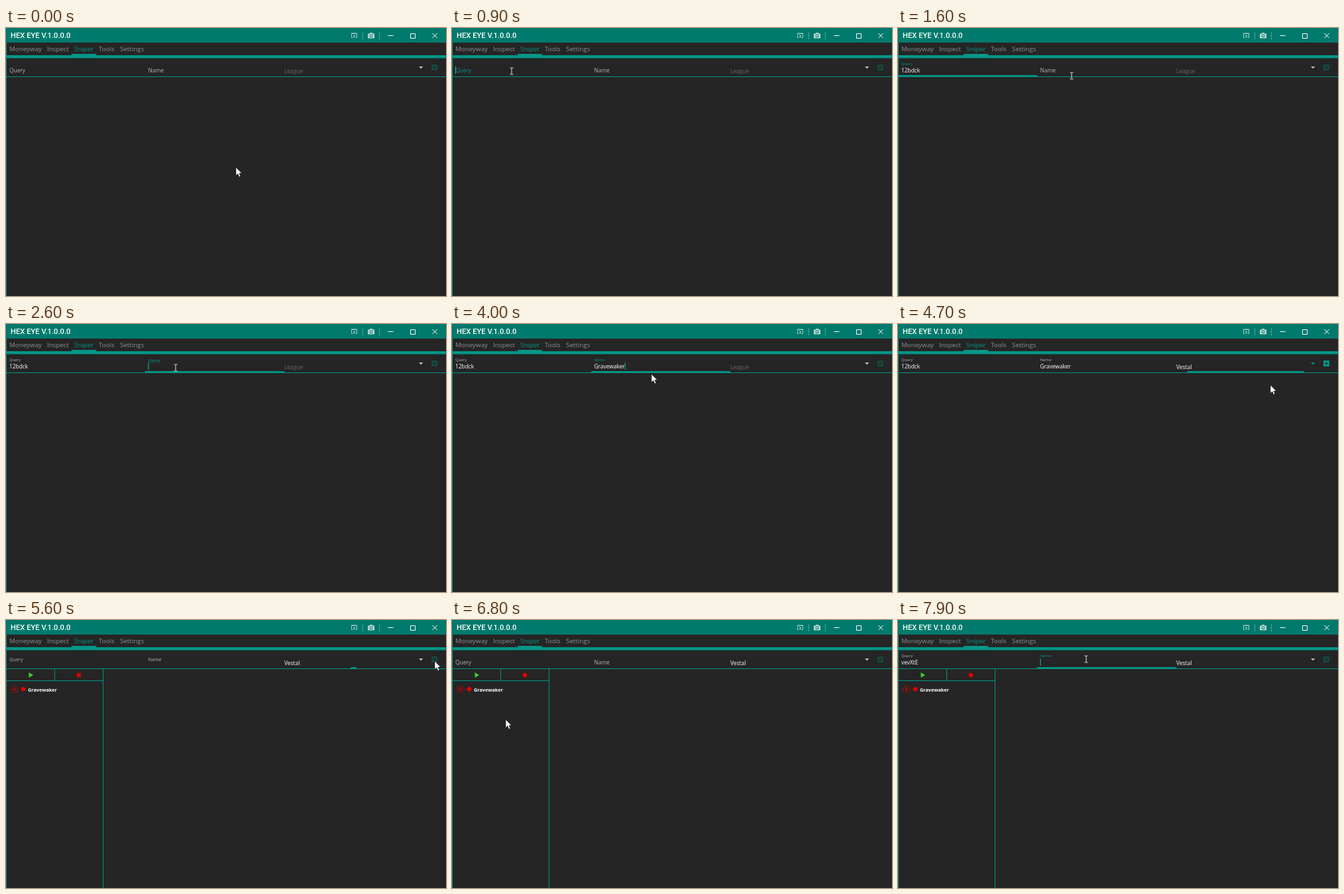
Write an HTML page that moves like this. It is 664 px wide and 404 px high and loops after 8 s.

```html
<!DOCTYPE html>
<html lang="en">
<head>
<meta charset="utf-8">
<title>Sniper tab</title>
<style>
  html, body { margin: 0; width: 100%; height: 100%; overflow: hidden; background: #252525; }
  svg { display: block; width: 664px; height: 404px; font-family: "Open Sans", "Noto Sans", sans-serif; }
  .title { font: 500 11.2px Roboto, sans-serif; fill: #fff; }
  .tabs { font-size: 9.8px; fill: #8f8f8f; }
  .value { font-size: 8.4px; fill: #fff; }
  .tree { font-size: 7.3px; font-weight: 700; fill: #fff; }
  .teal { fill: #009688; }
  .line { stroke: #009688; fill: none; }
</style>
</head>
<body>
<svg viewBox="0 0 664 404">
  <rect width="664" height="404" fill="#252525"/>
  <rect width="664" height="22" fill="#007a6d"/>
  <text class="title" x="7" y="15.3">HEX EYE V.1.0.0.0</text>
  <g fill="none" stroke="#9fcdc7">
    <path d="M523.5 14.5h-2v-6.5h8v6.5h-2M521 8.5h9M525.5 15v-4M523.7 12.6l1.8-1.8 1.8 1.8"/>
    <path d="M538.5 6v11M563.5 6v11" stroke="#4fa59b"/>
  </g>
  <path d="M546 8.5h2.5l1-1.5h3l1 1.5h2.500v7h-10z" fill="#b5d6d2"/>
  <circle cx="551" cy="11.800" r="2" fill="#b5d6d2" stroke="#007a6d"/>
  <path d="M576.500 11.500h8M610.500 8.500h7v7h-7zM643.500 8l7 7M650.500 8l-7 7" fill="none" stroke="#fff"/>

  <g class="tabs">
    <text x="5" y="35">Moneyway</text>
    <text x="62" y="35">Inspect</text>
    <text class="teal" x="103" y="35">Sniper</text>
    <text x="140" y="35">Tools</text>
    <text x="172" y="35">Settings</text>
  </g>
  <path class="teal" d="M99 39h37v2h-37zM0 41h664v4.500h-664zM0 73h664v1h-664zM0 22h1v382h-1z"/>

  <g id="panel">
    <path class="line" d="M146.500 74v330M1 91.500h145M73.500 74v17"/>
    <path d="M34.500 79l6.500 4-6.500 4z" fill="#3bd12f"/>
    <path d="M107 80h6v6h-6z" fill="#e00000"/>
    <path d="M10.500 100h5l2.500 2.500v4l-2.500 2.500h-5l-2.500-2.500v-4z" fill="none" stroke="#d00000"/>
    <path d="M11.500 103h3v3h-3z" fill="#d00000"/>
    <path d="M24.700 101h2.700l1.900 1.900v2.700l-1.900 1.900h-2.700l-1.900-1.900v-2.700z" fill="#e00000"/>
    <text class="tree" x="33" y="107.600">Gravewaker</text>
  </g>

  <g id="fields"></g>
  <text id="league" class="value" x="420" y="68"></text>
  <rect id="leagueBar" class="teal" y="71" height="2"/>
  <path id="drop" d="M623 58h6.500l-3.250 3.300z"/>
  <g id="add">
    <rect x="642" y="55" width="9" height="9" rx="1"/>
    <path d="M646.500 57v5M644 59.500h5" stroke="#252525"/>
  </g>

  <path id="arrow" d="M0 0v12.500l2.900-2.700 2 4.700 2.100-.9-2-4.600h3.800z" fill="#fff" stroke="#111" stroke-width=".6"/>
  <path id="beam" d="M-2.500-5h2l.5.500.500-.5h2M0-4.500v9M-2.500 5h2l.5-.5.500.500h2" fill="none" stroke="#e8e8e8"/>
</svg>
<script>
const LOOP = 8000, STEP = 100, ADD = 5400, PICK = 4550;
const $ = id => document.getElementById(id);
const clamp = u => Math.max(0, Math.min(1, u));
const smooth = u => (u = clamp(u)) * u * (3 - 2 * u);
const easeOut = u => 1 - (1 - clamp(u)) ** 2;

// Eased 0..1 level that rises at each span's start and falls at its end.
const level = (t, spans, dur, ease) => spans.reduce(
  (sum, [a, b]) => sum + ease((t - a) / dur) - ease((t - b) / dur), 0);
const active = (t, spans) => spans.find(([a, b]) => t >= a && t < b);

// Latest entry of [time, value] pairs.
const latest = (t, list) => list.reduce((v, [at, x]) => t >= at ? x : v, list[0][1]);

const NAME = "Gravewaker";
const fields = [
  { label: "Query", x: 0, textX: 5,
    floats: [[900, ADD], [7150, Infinity]],
    focus: [[900, 2300], [7150, 7500]],
    text: [[0, ""], [1300, "12bdck"], [ADD, ""], [7300, "vevXtE"]] },
  { label: "Name", x: 210, textX: 214.500,
    floats: [[2300, ADD], [7500, Infinity]],
    focus: [[2300, 4300], [7500, Infinity]],
    text: [[0, ""], ...[[2900, 1], [3000, 3], [3200, 4], [3300, 5], [3500, 6], [3600, 7],
      [3700, 9], [3800, 10]].map(([t, n]) => [t, NAME.slice(0, n)]), [ADD, ""]] }
];

const cursorPath = [
  [0, 347, 210], [400, 347, 210], [900, 90, 65], [1300, 90, 65], [1600, 262, 72],
  [2100, 256, 66], [3800, 256, 66], [4000, 301, 75.500], [4300, 545, 62], [4400, 545, 62],
  [4700, 562, 92], [4800, 562, 92], [5000, 630, 66], [5200, 647, 62], [6000, 647, 62],
  [6800, 81, 150], [7000, 81, 150], [7150, 70, 64], [7300, 70, 64], [7500, 270, 62],
  [7900, 284, 59]
];

function cursorAt(t) {
  const i = cursorPath.findIndex(k => k[0] > t);
  if (i < 0) return cursorPath.at(-1).slice(1);
  const [a, x, y] = cursorPath[i - 1], [b, x2, y2] = cursorPath[i];
  const u = smooth((t - a) / (b - a));
  return [x + (x2 - x) * u, y + (y2 - y) * u];
}

function make(tag, attrs) {
  const el = document.createElementNS("http://www.w3.org/2000/svg", tag);
  for (const k in attrs) el.setAttribute(k, attrs[k]);
  return $("fields").appendChild(el);
}

for (const f of fields) {
  f.hint = make("text", { x: f.textX });
  f.hint.textContent = f.label;
  f.value = make("text", { x: f.textX, y: 67, class: "value" });
  f.bar = make("rect", { y: 71, height: 2, class: "teal" });
  f.caret = make("rect", { y: 58, width: 1, height: 11, fill: "#1fb5a5" });
}

function setBar(bar, x, width, amount) {
  bar.setAttribute("x", x + width * (1 - amount) / 2);
  bar.setAttribute("width", width * amount);
}

const show = (el, on) => el.setAttribute("visibility", on ? "visible" : "hidden");

function drawField(f, t) {
  const up = level(t, f.floats, 400, smooth);
  const span = active(t, f.focus);
  const text = latest(t, f.text);
  f.hint.setAttribute("y", 67 - 10.800 * up);
  f.hint.setAttribute("font-size", 8.400 - 2.400 * up);
  f.hint.setAttribute("fill", span ? "#009688" : "#b4b4b4");
  f.value.textContent = text;
  setBar(f.bar, f.x, 210, level(t, f.focus, 250, easeOut));

  const lastEdit = f.text.reduce((v, [at]) => t >= at ? at : v, 0);
  const since = span ? t - Math.max(span[0], lastEdit === 1300 ? 0 : lastEdit) : 0;
  const width = text ? f.value.getComputedTextLength() : 0;
  f.caret.setAttribute("x", f.textX + width);
  show(f.caret, span && Math.floor(since / 500) % 2 === 0);
}

function draw(t) {
  for (const f of fields) drawField(f, t);

  const picked = t >= PICK, ready = picked && t < ADD;
  $("league").textContent = picked ? "Vestal" : "League";
  $("league").style.fill = picked ? "#fff" : "#666";
  setBar($("leagueBar"), 420, 209, level(t, [[PICK, ADD]], 250, easeOut));
  $("drop").setAttribute("fill", ready ? "#009688" : "#c0c0c0");
  $("add").setAttribute("fill", ready ? "#009688" : "#144842");
  show($("panel"), t >= ADD);

  const [x, y] = cursorAt(t);
  const overText = x < 420 && y > 46 && y < 74.500;
  for (const id of ["arrow", "beam"]) {
    show($(id), (id === "beam") === overText);
    $(id).setAttribute("transform", `translate(${x} ${y})`);
  }
}

function tick() {
  draw(Math.floor(performance.now() % LOOP / STEP) * STEP);
  requestAnimationFrame(tick);
}
tick();
</script>
</body>
</html>
```
